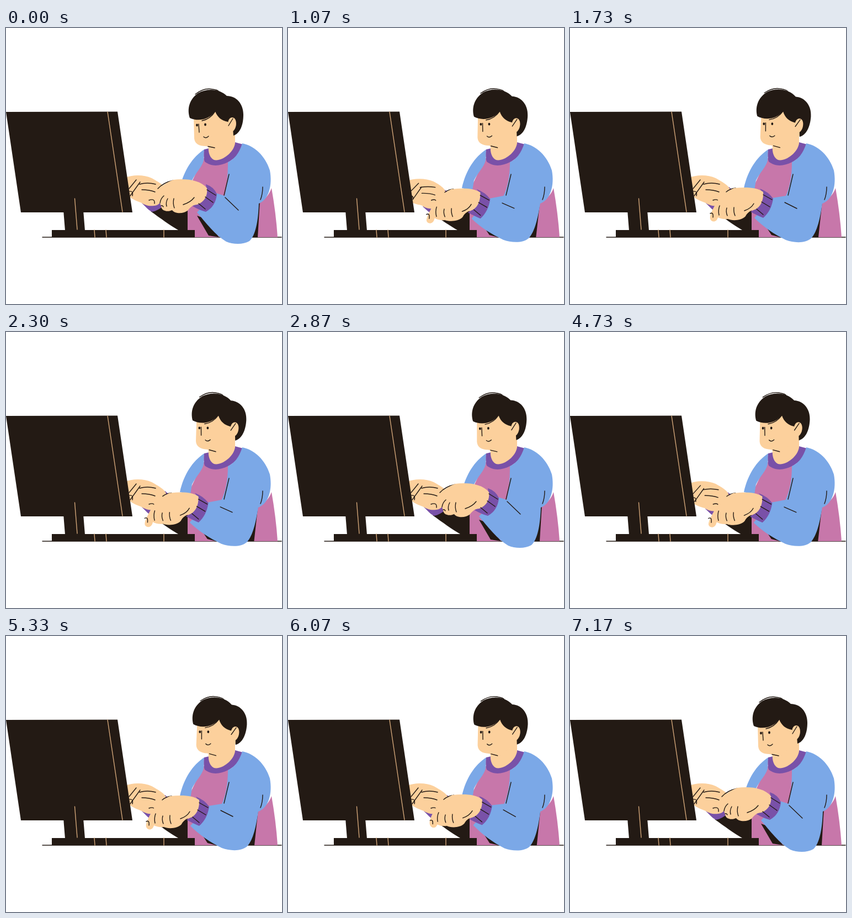
Recreate the animation shown at these times as an HTML page. Size 500x500 px, loop 7210 ms.

```html
<!DOCTYPE html>
<html lang="en">
<head>
<meta charset="utf-8">
<title>Typing at a computer</title>
<style>
html, body { margin: 0; width: 100%; height: 100%; overflow: hidden; background: #fff; }
svg { display: block; width: 100%; height: 100%; }
.dark { fill: #231a14; }
.skin { fill: #fcd09c; }
.blue { fill: #7ba8e7; }
.pink { fill: #c777aa; }
.purple { fill: #7951a8; }
.line, .tan { fill: none; stroke: #231a14; stroke-width: 1.4; stroke-linecap: round; stroke-linejoin: round; }
.tan { stroke: #d2a679; }
</style>
</head>
<body>
<svg viewBox="0 0 500 500">
  <path class="line" stroke-width="1.5" d="M66 379H499"/>

  <!-- torso -->
  <path class="dark" d="M440 300H466L458 379H436Z"/>
  <path class="pink" id="side"/>
  <path class="pink" d="M357 236L336 280L328 300V379H385L402 335L406 236Z"/>
  <path class="dark" id="gap"/>
  <path class="blue" d="M359 220C338 234 322 258 315 290L334 294L337 276C344 262 355 252 358 240Z"/>

  <!-- neck and collar -->
  <path class="purple" d="M359 220C358 230 358 236 360 242C372 252 388 250 402 243C416 236 426 224 430 211L415 207Z"/>
  <path class="skin" d="M366 200L367 222C368 231 372 237 377 239C390 242 412 227 415 209V180Z"/>

  <g id="head">
    <path class="skin" d="M340 160L341 200C342 210 350 214 362 214C372 217 384 216 392 208L413 192V150L370 130Z"/>
    <path class="dark" d="M333 163C328 148 331 130 348 118C366 108 388 111 400 123C417 123 430 137 430 157C430 176 424 191 412 195L411 182L402 170C391 168 383 162 379 151C368 166 348 170 333 163Z"/>
    <path class="skin" d="M402 172C403 164 408 160 413 163C419 167 418 182 411 187L401 187Z"/>
    <path class="line" d="M403 177L411 164M379 151Q370 165 355 168M349 174L350 189M358 197Q362 201 367 196M366 214.500L378 217"/>
    <path class="line" stroke-width="1" d="M343 120Q357 109 371 110.500T385 115"/>
    <ellipse class="dark" cx="346" cy="176" rx="1.900" ry="2.400"/>
    <ellipse class="dark" cx="361" cy="175" rx="1.900" ry="2.400"/>
  </g>

  <!-- far arm -->
  <path class="dark" id="farSleeve"/>
  <path class="purple" id="farCuff"/>
  <path class="skin" id="farHand"/>
  <path class="line" id="farLines"/>

  <!-- near arm -->
  <path class="blue" id="sleeve"/>
  <path class="purple" id="cuff"/>
  <path class="line" id="rim"/>
  <path class="skin" id="hand"/>
  <path class="line" id="armLines"/>
  <path class="line" d="M404 265L395 303M465 288Q465 301 461 311"/>

  <!-- computer -->
  <path class="dark" d="M0 152L202 151.500L229 334H27ZM104 330H140L143 367H107ZM83 366H342V379H83Z"/>
  <path class="tan" d="M184 152L211 333M124.500 309L129 365M160 366L161 379M181 366L182 379M286 366V379"/>
</svg>
<script>
const LOOP = 7210, CYCLE = LOOP / 2;

// Each part: path at rest, path when lowered.
const near = {
  side: ["M460 314Q474 309 481 290Q489 335 492 379H456Z",
         "M457 314Q474 309 481 290Q489 335 492 379H450Z"],
  gap: ["M346 340L367 376L386 379L360 345Z",
        "M350 352L365 375L384 380L360 358Z"],
  sleeve: ["M428 209C450 213 470 232 478 258C483 285 476 311 458 318C457 350 452 376 441 386C429 393 411 392 399 387C380 376 362 353 346 334L380 299L396 304Q402 280 402 243Q420 235 428 209Z",
           "M428 209C450 213 470 232 478 258C483 285 476 311 457 318C453 345 448 369 437 381C425 391 405 389 391 384C370 374 350 360 334 344L366 308L391 304Q402 280 402 243Q420 235 428 209Z"],
  cuff: ["M362 283Q377 288 382 301Q380 323 362 333Q350 330 337 322C346 320 360 312 364 295Z",
         "M344 291Q360 297 368 309Q365 331 350 344Q340 340 327 333C338 328 348 315 350 300Z"],
  rim: ["M275 291Q285 280 303 276", "M283 297Q290 291 300 290"],
  hand: ["M364 290C352 275 325 272 303 275C290 280 280 287 274 297C271 304 273 312 279 317C281 322 281 330 288 331C293 333 298 331 301 330C306 337 322 337 330 330C334 324 340 320 346 320C358 316 366 305 364 290Z",
         "M350 297C338 288 318 288 297 290C282 297 268 308 262 322C255 335 253 341 254 346C257 353 266 352 268 343C272 345 278 347 286 346C292 349 310 350 318 341C321 335 326 331 332 330C343 327 351 315 350 297Z"],
  armLines: ["M286 304Q280 309 279 317M293 309Q289 316 291 323M304 309Q302 318 305 326M321 320Q334 316 341 307M364 293L380 303M361 306L375 316M349 318L361 328M397 307L421 330M281 322Q284 321 285 324",
             "M271 322Q268 330 270 339M284 326Q282 333 285 340M297 325Q296 333 299 340M316 331Q328 327 333 318M350 302L366 311M347 315L362 324M338 328L350 338M389 316L411 327M254 336Q260 333 259 343"]
};
const far = {
  farSleeve: ["M262 332C280 345 298 358 312 366L329 366L329 320L290 310Z",
              "M260 356C270 360 280 363 286 366L329 366L329 320L285 318Z"],
  farCuff: ["M246 317C254 325 259 331 265 333C280 330 292 318 300 298L288 288Z",
            "M237 349C246 354 254 357 262 357C280 351 289 340 291 324L270 314Z"],
  farHand: ["M214 272C230 265 250 266 264 272C276 279 286 284 290 292C288 306 280 322 268 322C258 323 252 321 246 317C238 314 228 310 222 304L212 300Z",
            "M214 302C228 296 250 298 262 302C270 305 274 312 270 322C264 336 252 349 240 349C233 346 229 342 226 338C220 344 214 350 207 347L205 330Z"],
  farLines: ["M223 291L236 275M225 304L243 279M242 283Q256 279 271 283M246 293Q260 293 270 297M259 312Q270 308 269 318M224 296Q231 295 229 304",
             "M225 310L239 306M231 336L238 324M229 312Q240 316 250 311M228 325Q242 323 252 325M262 312Q270 310 268 319M208 341Q211 330 217 336Q216 342 210 343"]
};

const number = /-?\d+(\.\d+)?/g;
function mix(a, b, t) {
  const ends = b.match(number);
  let i = 0;
  return a.replace(number, n => (+n + (ends[i++] - n) * t).toFixed(2));
}
function pose(parts, t) {
  for (const id in parts)
    document.getElementById(id).setAttribute("d", mix(...parts[id], t));
}

const nearKeys = [[0, 0], [560, 0], [1070, 1.12], [1725, 1], [2300, 1.1], [2870, 0], [CYCLE, 0]];
function ease(keys, t) {
  const i = keys.findIndex(k => k[0] > t);
  const [t0, v0] = keys[i - 1], [t1, v1] = keys[i];
  const u = (t - t0) / (t1 - t0);
  return v0 + (v1 - v0) * u * u * (3 - 2 * u);
}

const head = document.getElementById("head");
function draw(now) {
  const t = now % CYCLE;
  const sway = (1 - Math.cos(2 * Math.PI * t / CYCLE)) / 2;
  head.setAttribute("transform",
    `translate(${2.5 * sway} ${0.5 * sway}) rotate(${4 * sway} 390 215)`);
  pose(near, ease(nearKeys, t));
  pose(far, t < 1250 ? Math.sin(Math.PI * t / 1250) ** 2 * 1.06 : 0);
  requestAnimationFrame(() => draw(performance.now()));
}
draw(performance.now());
</script>
</body>
</html>
```
